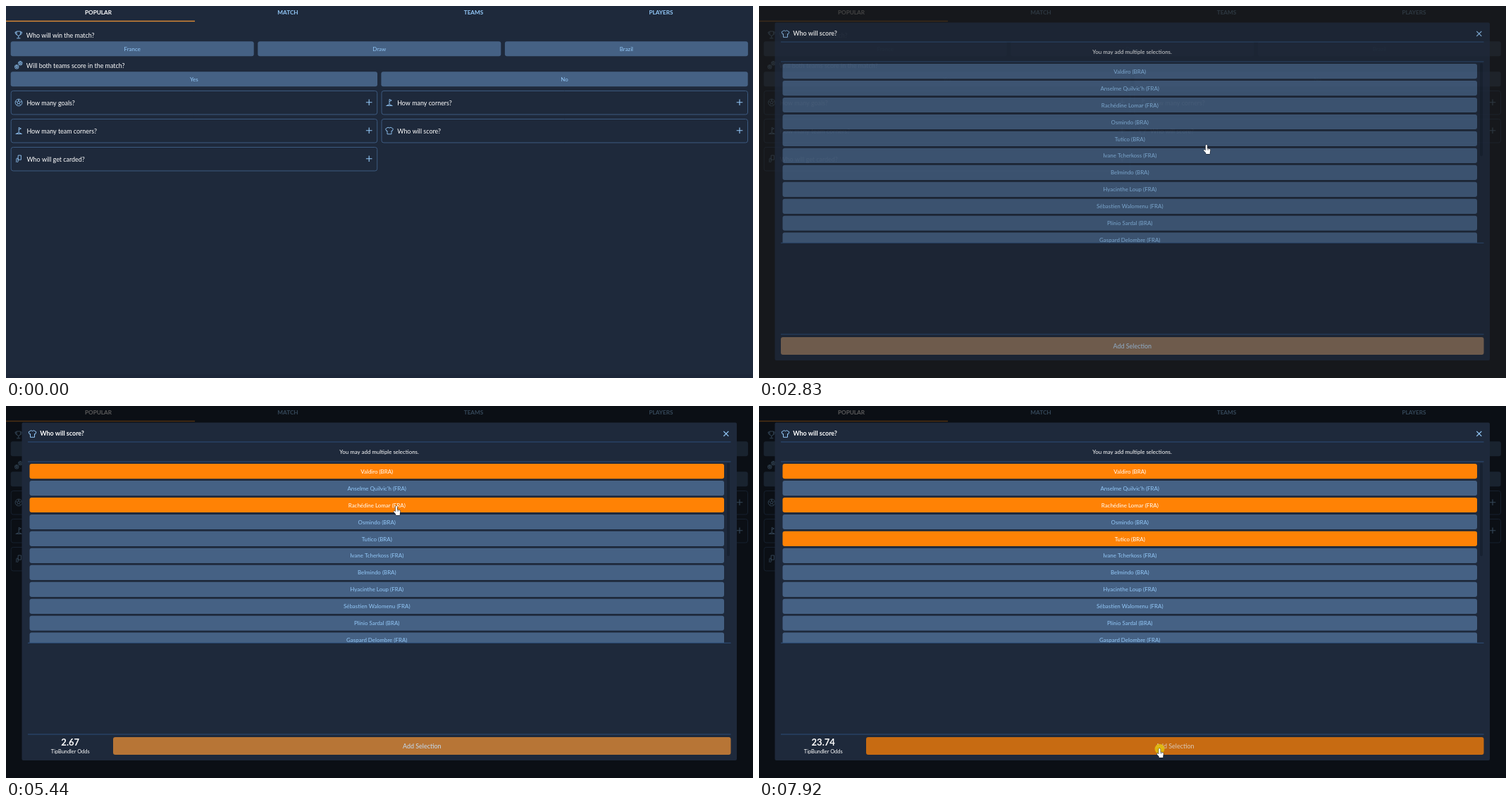
Animation, 1060 px wide and 528 px high, one loop 7990 ms. Source, as an HTML page with a canvas:

```html
<!DOCTYPE html>
<html lang="en">
<head>
<meta charset="utf-8">
<title>Bet selection</title>
<style>
html, body { margin: 0; width: 100%; height: 100%; overflow: hidden; background: #1e293b; }
canvas { display: block; position: absolute; left: 0; top: 0; }
</style>
</head>
<body>
<canvas id="stage" width="1060" height="528"></canvas>
<script>
const LOOP = 7990, W = 1060, H = 528;
const BG = '#1e293b', BLUE = '#456184', LINK = '#93c8f8', LINE = '#3c5a80', ORANGE = '#ff8205';
const stage = document.getElementById('stage').getContext('2d');
const layer = document.createElement('canvas');
layer.width = W;
layer.height = H;
const sheet = layer.getContext('2d');
let ctx = stage;

const players = [
  'Valdiro (BRA)', "Anselme Quilvic'h (FRA)", 'Rachédine Lomar (FRA)', 'Osmindo (BRA)',
  'Tutico (BRA)', 'Ivane Tcherkoss (FRA)', 'Belmindo (BRA)', 'Hyacinthe Loup (FRA)',
  'Sébastien Walomenu (FRA)', 'Plínio Sardal (BRA)', 'Gaspard Delombre (FRA)'
];
const picked = { 0: 3960, 2: 5310, 4: 6460 };           // row: time of selection
const prices = [[4480, '2.67'], [6020, '7.28'], [7060, '23.74']];
const clicks = [[2290, 2420], [3700, 3900], [4970, 5250], [6200, 6400], [7840, LOOP]];
const toggles = [[2650, 0], [4480, 1], [5346, 0], [5830, 1], [6497, 0], [7060, 1]];

// time, x, y of the pointer tip
const pointer = [
  [580, 1020, 504], [1340, 724, 267], [1600, 724, 267], [2150, 632, 193.5], [2420, 632, 193.5],
  [2830, 635, 197], [3170, 569, 116], [3700, 555, 94.5], [3840, 555, 94.5], [3900, 556, 99],
  [4640, 556, 134], [4970, 554, 139.5], [5250, 554, 139.5], [5440, 554, 142], [6000, 551, 182],
  [6200, 549, 188.5], [6400, 549, 188.5], [6750, 555, 258.5], [7160, 560, 402], [7640, 568.5, 486]
];
// time, shade alpha, shade grey, dialog alpha
const opening = [[2420, 0, 20, 0], [2830, .8, 20, .8], [3170, .64, 0, 1]];

const icons = {
  trophy: 'M-2.8-5H2.8V-2Q2.8 1 0 1.4Q-2.8 1-2.8-2ZM-2.8-4H-4.8Q-4.8-.6-2.5-.3M2.8-4H4.8Q4.8-.6 2.5-.3M0 1.4V4.4M-2.6 4.8H2.6',
  flag: 'M0 3V-4.6L3.2-3L0-1.4M-4.6 4.5H4.6M-3.4 4Q0 1.4 3.4 4',
  shirt: 'M-2-4.8Q0-3 2-4.8L5.4-2.6L4.2.4L3 0V4.8H-3V0L-4.2.4L-5.4-2.6Z',
  card: 'M-1-5H3.2V1.2H-1ZM-3.4 5V.2Q-3.4-1-2.3-1Q-1-1-1 .5V3.5L-2 5',
  plus: 'M-4.3 0H4.3M0-4.3V4.3',
  cross: 'M-3.5-3.5L3.5 3.5M3.5-3.5L-3.5 3.5'
};
const hand = new Path2D('M-1.3 1.2a1.2 1.2 0 0 1 2.4 0V5.2L4.6 6Q5.6 6.4 5.4 8L4.8 11V13H-.8V11.5L-3.9 8.2Q-4.2 6.8-2.8 7L-1.3 8.2Z');

const clamp = v => Math.min(1, Math.max(0, v));
const easeOut = v => 1 - (1 - clamp(v)) ** 2;
const mix = (a, b, f) => `rgb(${a.map((v, i) => Math.round(v + (b[i] - v) * f))})`;

// Monotone cubic interpolation of every column after the time
function track(keys, t) {
  const last = keys.length - 1;
  if (t <= keys[0][0]) return keys[0].slice(1);
  if (t >= keys[last][0]) return keys[last].slice(1);
  const i = keys.findIndex(k => k[0] > t) - 1;
  const dt = keys[i + 1][0] - keys[i][0], u = (t - keys[i][0]) / dt;
  const slope = (j, c) => (keys[j + 1][c] - keys[j][c]) / (keys[j + 1][0] - keys[j][0]);
  const tangent = (j, c) => {
    if (j < 1 || j >= last) return 0;
    const a = slope(j - 1, c), b = slope(j, c);
    return a * b <= 0 ? 0 : 2 * a * b / (a + b);
  };
  return keys[i].slice(1).map((v, n) => {
    const c = n + 1, s = u * u * (3 - 2 * u);
    return v + (keys[i + 1][c] - v) * s
      + dt * u * (1 - u) * ((1 - u) * tangent(i, c) - u * tangent(i + 1, c));
  });
}

// Share of orange in the confirm button
function activeShare(t) {
  let share = 1;
  for (const [start, goal] of toggles) {
    if (t >= start) share = share + (goal - share) * easeOut((t - start) / 440);
  }
  return share;
}

function text(s, x, y, { size = 8.93, color = '#fff', align = 'left', weight = 400 } = {}) {
  ctx.font = `${weight} ${size}px Lato, sans-serif`;
  ctx.textAlign = align;
  ctx.fillStyle = color;
  ctx.fillText(s, x, y + size * .36);
}

function box(x, y, w, h, fill, radius = 3) {
  ctx.beginPath();
  ctx.roundRect(x, y, w, h, radius);
  ctx.fillStyle = fill;
  ctx.fill();
}

function button(label, x, y, w, h, fill = BLUE, color = LINK, size = 7.95) {
  box(x, y, w, h, fill);
  text(label, x + w / 2, y + h / 2 + .2, { size, color, align: 'center' });
}

function icon(name, x, y, width = .9) {
  ctx.save();
  ctx.translate(x, y);
  ctx.strokeStyle = LINK;
  ctx.lineWidth = width;
  ctx.lineJoin = 'round';
  ctx.stroke(new Path2D(icons[name]));
  ctx.restore();
}

function ball(x, y, r) {
  ctx.strokeStyle = LINK;
  ctx.lineWidth = .8;
  ctx.beginPath();
  ctx.arc(x, y, r, 0, 7);
  for (let i = 0; i <= 5; i++) {
    const a = i * Math.PI * .4 - Math.PI / 2, px = Math.cos(a), py = Math.sin(a);
    ctx[i ? 'lineTo' : 'moveTo'](x + px * r * .42, y + py * r * .42);
    ctx.lineTo(x + px * r * .9, y + py * r * .9);
    ctx.moveTo(x + px * r * .42, y + py * r * .42);
  }
  ctx.stroke();
}

function panel(label, name, x, y) {
  ctx.beginPath();
  ctx.roundRect(x + .5, y + .5, 519.5, 33.5, 3);
  ctx.strokeStyle = LINE;
  ctx.lineWidth = 1;
  ctx.stroke();
  if (name === 'ball') ball(x + 11.3, y + 17, 4.9);
  else icon(name, x + 11.5, y + 17);
  text(label, x + 22.7, y + 17.7);
  icon('plus', x + 508.5, y + 16.8, 1.1);
}

function page() {
  ctx.fillStyle = BG;
  ctx.fillRect(0, 0, W, H);
  ctx.fillStyle = '#1c2638';
  ctx.fillRect(0, 523, W, 5);

  [['POPULAR', 131], ['MATCH', 400], ['TEAMS', 663.5], ['PLAYERS', 929.5]].forEach(([s, x], i) =>
    text(s, x, 8.8, { size: 8.2, weight: 700, align: 'center', color: i ? LINK : '#fff' }));
  ctx.fillStyle = '#e08c36';
  ctx.fillRect(0, 20.8, 268, 1.4);

  icon('trophy', 17.8, 41);
  text('Who will win the match?', 28.8, 41.3);
  ['France', 'Draw', 'Brazil'].forEach((s, i) => button(s, 6.7 + i * 350.6, 50.3, 345, 21));

  ball(20.3, 81.2, 2.8);
  ball(15.2, 86.4, 2.8);
  text('Will both teams score in the match?', 28.8, 84.3);
  button('Yes', 6.7, 93.2, 520.3, 21);
  button('No', 532.4, 93.2, 520.3, 21);

  panel('How many goals?', 'ball', 6.7, 120);
  panel('How many corners?', 'flag', 532.5, 120);
  panel('How many team corners?', 'flag', 6.7, 160);
  panel('Who will score?', 'shirt', 532.5, 160);
  panel('Who will get carded?', 'card', 6.7, 200);
}

function rule(y) {
  ctx.fillStyle = '#2d4f7a';
  ctx.fillRect(31, y, 997.5, 1);
}

function dialog(t) {
  ctx.clearRect(0, 0, W, H);
  box(22.5, 23.5, 1014.5, 479.5, BG, 2);
  icon('shirt', 37.5, 39.5, 1);
  text('Who will score?', 48.2, 39.2, { weight: 700 });
  icon('cross', 1021.8, 39.4, 1.3);
  rule(50.5);
  text('You may add multiple selections.', 529.5, 65, { size: 7.9, align: 'center' });
  rule(78.5);

  ctx.save();
  ctx.beginPath();
  ctx.rect(31, 79, 998, 257);
  ctx.clip();
  players.forEach((name, i) => {
    const on = t >= picked[i];
    button(name, 33.5, 82 + i * 23.96, 985.5, 21.2, on ? ORANGE : BLUE, on ? '#fff' : LINK);
  });
  box(1023, 81, 4, 132, '#172131', 2);
  ctx.restore();
  rule(335.8);
  rule(465.5);

  const price = prices.filter(p => t >= p[0]).pop();
  if (price) {
    text(price[1], 91.2, 477.6, { size: 13, weight: 700, align: 'center' });
    text('TipBundler Odds', 91.2, 490, { size: 7.4, align: 'center' });
  }
  const left = price ? 152 : 31, share = activeShare(t);
  ctx.globalAlpha = 1 - .25 * clamp((t - 7800) / 120);
  button('Add Selection', left, 470, 1028.5 - left, 25,
    mix([69, 97, 132], [255, 130, 5], share), mix([147, 200, 248], [225, 232, 240], share), 8.93);
  ctx.globalAlpha = 1;
}

function cursor(t) {
  if (t < 580) return;
  const [x, y] = track(pointer, t);
  if (clicks.some(([from, to]) => t >= from && t < to)) {
    ctx.beginPath();
    ctx.arc(x, y + .7, 7, 0, 7);
    ctx.fillStyle = 'rgba(226,190,10,.85)';
    ctx.fill();
  }
  ctx.save();
  ctx.translate(x, y);
  ctx.strokeStyle = '#10151f';
  ctx.lineWidth = 1;
  ctx.stroke(hand);
  ctx.fillStyle = '#fff';
  ctx.fill(hand);
  ctx.beginPath();
  ctx.moveTo(1.2, 7.6);
  ctx.lineTo(1.2, 5.4);
  ctx.moveTo(3, 7.8);
  ctx.lineTo(3, 5.9);
  ctx.lineWidth = .5;
  ctx.stroke();
  ctx.restore();
}

function draw(now) {
  const t = now % LOOP;
  ctx = stage;
  page();
  if (t > opening[0][0]) {
    const [shade, grey, alpha] = track(opening, t);
    ctx.fillStyle = `rgba(${grey},${grey},${grey},${shade})`;
    ctx.fillRect(0, 0, W, H);
    ctx = sheet;
    dialog(t);
    ctx = stage;
    ctx.globalAlpha = alpha;
    ctx.drawImage(layer, 0, 0);
    ctx.globalAlpha = 1;
  }
  cursor(t);
}

const begin = performance.now();
function tick() {
  draw(performance.now() - begin);
  requestAnimationFrame(tick);
}
tick();
</script>
</body>
</html>
```
